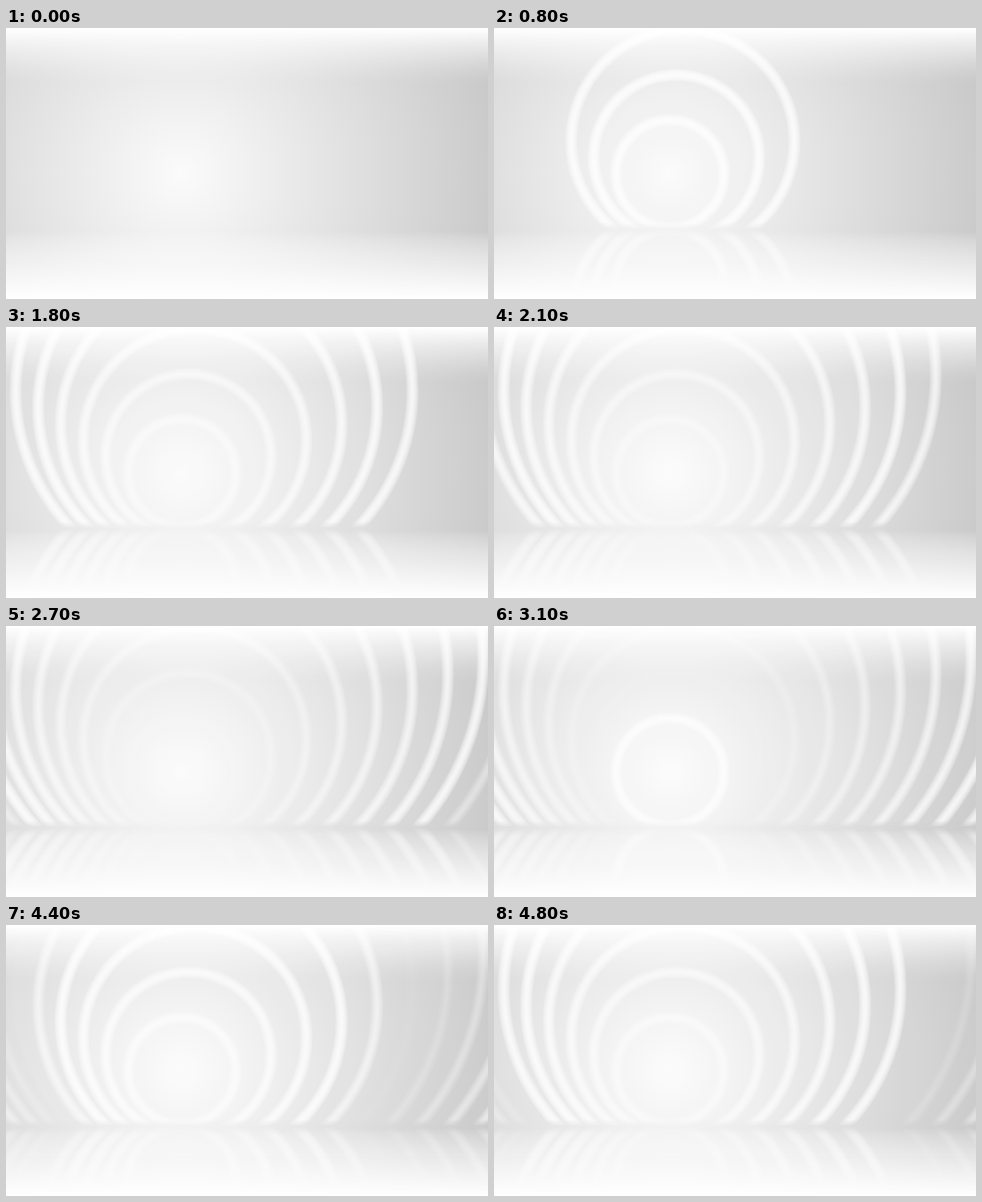
Animation of 600x338 px, one loop 5 s. Source, as an HTML page with a canvas:

```html
<!DOCTYPE html>
<html lang="en">
<head>
<meta charset="utf-8">
<title>Light rings</title>
<style>
html, body { margin: 0; width: 100%; height: 100%; overflow: hidden; background: #fff; }
canvas { display: block; width: 100vw; height: 100vh; }
</style>
</head>
<body>
<canvas id="stage" width="600" height="338"></canvas>
<script>
const W = 600, H = 338, HORIZON = 250, CEILING = 70;
const LOOP = 5000, TICK = 100;
const RINGS = 10, SPACING = 332, CYCLE = 3000, RISE = 200, LIFE = 2800;
const ctx = document.getElementById('stage').getContext('2d');

const clamp = (v) => Math.min(1, Math.max(0, v));

function makeLayer() {
  const c = document.createElement('canvas');
  c.width = W;
  c.height = H;
  return c.getContext('2d');
}

// White rows whose opacity follows alphaAt(y)
function paintRows(c, alphaAt) {
  for (let y = 0; y < H; y++) {
    c.fillStyle = `rgba(255,255,255,${alphaAt(y).toFixed(4)})`;
    c.fillRect(0, y, W, 1);
  }
}

function veilAlpha(y) {
  const top = clamp(1 - y / CEILING);
  const bottom = clamp((y - HORIZON - 4) / (H - HORIZON - 4));
  return top ** 1.4 + bottom ** 0.75;
}

// Full light on the wall, a weaker mirror image on the floor
function lightAlpha(y) {
  if (y < HORIZON) return clamp((HORIZON + 1 - y) / 9);
  return 0.6 * clamp((y - HORIZON) / 12) * clamp((H - y) / 40);
}

function paintRoom(c) {
  const glow = c.createRadialGradient(219, 182, 0, 219, 182, 400);
  glow.addColorStop(0, 'rgb(251,251,251)');
  glow.addColorStop(1, 'rgb(201,201,201)');
  c.fillStyle = glow;
  c.fillRect(0, 0, W, H);
  paintRows(c, veilAlpha);
}

const room = makeLayer();
const light = makeLayer();
const mask = makeLayer();
paintRoom(room);
paintRows(mask, lightAlpha);

function envelope(age) {
  if (age <= 0) return 0;
  if (age < RISE) return Math.sin(Math.PI / 2 * age / RISE);
  return clamp(1 - (age - RISE) / (LIFE - RISE));
}

function ringLevel(i, t) {
  const age = t - SPACING * i;
  return Math.max(envelope(age), envelope(age - CYCLE));
}

function paintRing(c, i, level) {
  c.beginPath();
  c.arc(219 + 8 * i, 182 - 20.5 * i, 67 + 36 * i, 0, 2 * Math.PI);
  c.fillStyle = `rgba(255,255,255,${0.035 * level})`;
  c.fill();
  c.strokeStyle = `rgba(255,255,255,${0.28 * level})`;
  for (let width = 15; width > 0; width -= 3) {
    c.lineWidth = width;
    c.stroke();
  }
}

function paintRings(c, t) {
  c.save();
  c.beginPath();
  c.rect(0, 0, W, HORIZON);
  c.clip();
  for (let i = 0; i < RINGS; i++) paintRing(c, i, ringLevel(i, t));
  c.restore();
}

function draw(t) {
  light.clearRect(0, 0, W, H);
  paintRings(light, t);
  light.save();
  light.translate(0, 2 * HORIZON);
  light.scale(1, -1);
  paintRings(light, t);
  light.restore();

  light.globalCompositeOperation = 'destination-in';
  light.drawImage(mask.canvas, 0, 0);
  light.globalCompositeOperation = 'source-over';

  ctx.drawImage(room.canvas, 0, 0);
  ctx.drawImage(light.canvas, 0, 0);
}

const start = performance.now();
function tick() {
  const t = (performance.now() - start) % LOOP;
  draw(Math.floor(t / TICK) * TICK);
  requestAnimationFrame(tick);
}
tick();
</script>
</body>
</html>
```
